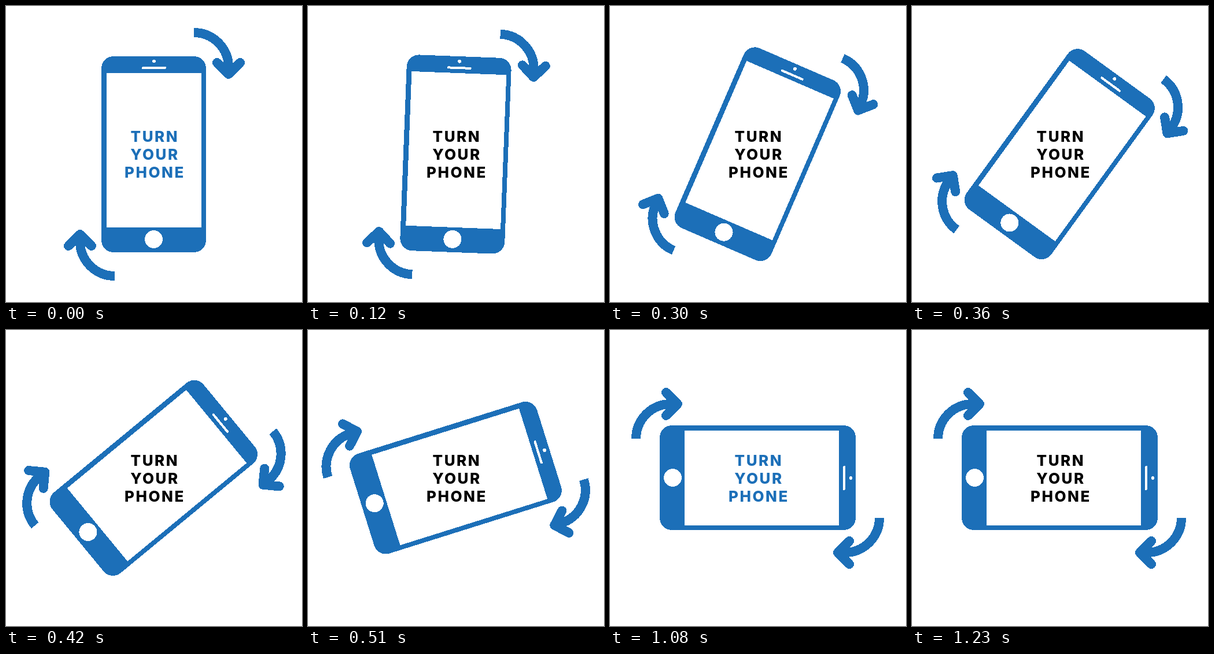
Write an HTML page that moves like this. It is 512 px wide and 512 px high and loops after 1.8 s.

```html
<!DOCTYPE html>
<html lang="en">
<head>
<meta charset="utf-8">
<title>Turn your phone</title>
<style>
  html, body { margin: 0; height: 100%; overflow: hidden; background: #fff; }
  svg { display: block; width: 100%; height: 100%; }
  #device { shape-rendering: crispEdges; }
  .blue { fill: #1c6fb8; }
  .white { fill: #fff; }
  .line { fill: none; stroke: #1c6fb8; stroke-width: 16; stroke-linejoin: round; }
  .head { stroke-linecap: round; }
  text {
    font: 800 26px Inter, "Open Sans", sans-serif;
    letter-spacing: 2.5px;
    text-anchor: middle;
  }
</style>
</head>
<body>
<svg viewBox="0 0 512 512">
  <g id="device">
    <rect class="blue" x="165" y="87" width="181" height="339" rx="21"/>
    <rect class="white" x="174" y="116" width="164" height="267"/>
    <circle class="white" cx="256" cy="95.5" r="3"/>
    <rect class="white" x="235" y="105" width="42" height="4" rx="2"/>
    <circle class="white" cx="255.5" cy="403.5" r="15.5"/>
    <g id="arrow">
      <path class="line" d="M324.7 46H325A60 60 0 0 1 385 106V116"/>
      <path class="line head" d="M365 98l20 20 20-20"/>
    </g>
    <use href="#arrow" transform="rotate(180 256.5 256.5)"/>
  </g>
  <g id="label">
    <text x="257.4" y="235">TURN</text>
    <text x="257.4" y="266">YOUR</text>
    <text x="257.4" y="297">PHONE</text>
  </g>
</svg>
<script>
  const LOOP = 1800, STEP = 30, TURN = 600;
  const FLASHES = [0, 1080, 1200];
  const device = document.getElementById('device');
  const label = document.getElementById('label');
  const start = performance.now();

  // Slow start, softly braked stop: a cosine cut short of its half period
  const swing = x => 1 - Math.cos(2.6 * x ** 1.34);
  const ease = x => swing(x) / swing(1);

  function draw() {
    const elapsed = (performance.now() - start) % LOOP;
    const time = Math.floor(elapsed / STEP) * STEP;
    const angle = 90 * ease(Math.min(time / TURN, 1));
    device.setAttribute('transform', `rotate(${angle} 256 256)`);
    label.setAttribute('fill', FLASHES.includes(time) ? '#1c6fb8' : '#000');
    requestAnimationFrame(draw);
  }
  draw();
</script>
</body>
</html>
```
